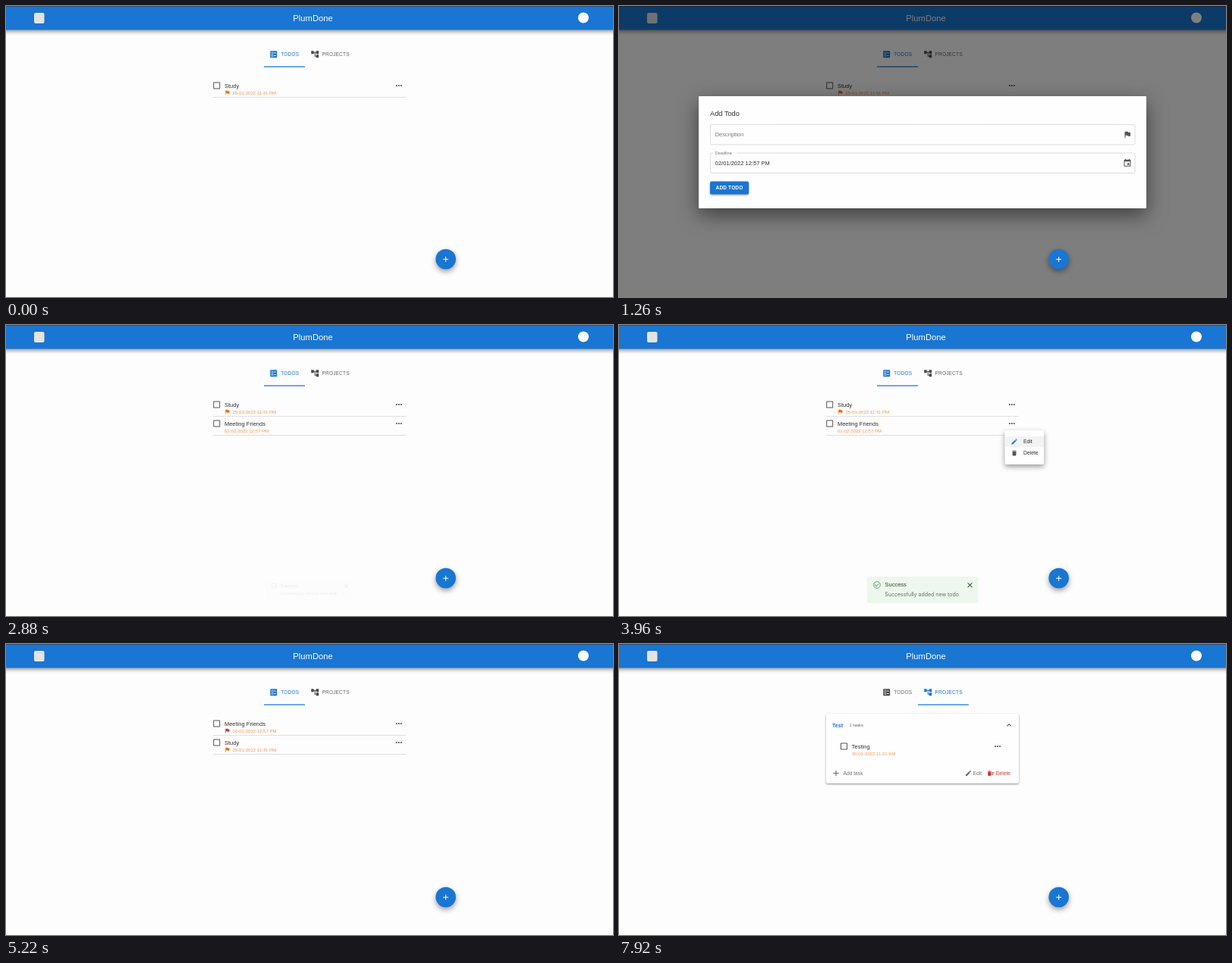
Recreate the animation shown at these times as an HTML page with a canvas. Size 800 px wide and 384 px high, loop 8 s.

```html
<!DOCTYPE html>
<html lang="en">
<head>
<meta charset="utf-8">
<title>Todo app demo</title>
<style>
html, body { margin: 0; width: 100%; height: 100%; overflow: hidden; background: #fefdfe; }
canvas { display: block; }
</style>
</head>
<body>
<canvas id="stage" width="800" height="384"></canvas>
<script>
const ctx = document.getElementById('stage').getContext('2d');
const LOOP = 8000;
const SANS = '"Liberation Sans", Arial, sans-serif';
const BLUE = '#1976d2', ORANGE = '#ed6c02', RED = '#d32f2f', INK = '#2c2c2e', GREY = '#666';
const MEETING = 'Meeting Friends', DUE = '02/01/2022 12:57 PM';

// Icons on a 24 unit grid
const ICONS = {
  tree: 'M22 11V3h-7v3H9V3H2v8h7V8h2v10h4v3h7v-8h-7v3h-2V8h2v3z',
  ballot: 'M13 9.5h5v-2h-5zM13 16.5h5v-2h-5zM19 21H5c-1.1 0-2-.9-2-2V5c0-1.1.9-2 2-2h14c1.1 0 2 .9 2 2v14c0 1.1-.9 2-2 2zM6 11h5V6H6zM7 7h3v3H7zM6 18h5v-5H6zM7 14h3v3H7z',
  list: 'M20 3H4c-1.1 0-2 .9-2 2v14c0 1.1.9 2 2 2h16c1.1 0 2-.9 2-2V5c0-1.1-.9-2-2-2zM10 17H5v-2h5zM10 13H5v-2h5zM10 9H5V7h5zM14.8 15L12 12.2l1.4-1.4 1.4 1.4L18 9l1.4 1.4z',
  flag: 'M14.4 6L14 4H5v17h2v-7h5.6l.4 2h7V6z',
  more: 'M4 12a2 2 0 1 0 4 0a2 2 0 1 0-4 0zM10 12a2 2 0 1 0 4 0a2 2 0 1 0-4 0zM16 12a2 2 0 1 0 4 0a2 2 0 1 0-4 0z',
  date: 'M17 12h-5v5h5zM16 1v2H8V1H6v2H5c-1.1 0-2 .9-2 2v14c0 1.1.9 2 2 2h14c1.1 0 2-.9 2-2V5c0-1.1-.9-2-2-2h-1V1zM19 19H5V8h14z',
  box: 'M19 5v14H5V5zM19 3H5c-1.1 0-2 .9-2 2v14c0 1.1.9 2 2 2h14c1.1 0 2-.9 2-2V5c0-1.1-.9-2-2-2z',
  add: 'M19 13h-6v6h-2v-6H5v-2h6V5h2v6h6z',
  edit: 'M3 17.25V21h3.75L17.8 9.94l-3.75-3.75zM20.7 7.04c.4-.4.4-1 0-1.4l-2.34-2.35c-.4-.4-1-.4-1.4 0l-1.83 1.83 3.75 3.75z',
  bin: 'M6 19c0 1.1.9 2 2 2h8c1.1 0 2-.9 2-2V7H6zM19 4h-3.5l-1-1h-5l-1 1H5v2h14z',
  sweep: 'M15 16h4v2h-4zM15 8h7v2h-7zM15 12h6v2h-6zM3 18c0 1.1.9 2 2 2h6c1.1 0 2-.9 2-2V8H3zM14 5h-3l-1-1H6L5 5H2v2h12z',
  close: 'M19 6.4L17.6 5 12 10.6 6.4 5 5 6.4 10.6 12 5 17.6 6.4 19 12 13.4 17.6 19 19 17.6 13.4 12z',
  done: 'M16.6 7.6L10 14.2l-3.6-3.6L5 12l5 5 8-8zM2 12a10 10 0 1 0 20 0a10 10 0 1 0-20 0zM4 12a8 8 0 1 0 16 0a8 8 0 1 0-16 0z',
  up: 'M12 8l-6 6 1.4 1.4 4.6-4.6 4.6 4.6L18 14z'
};
for (const k in ICONS) ICONS[k] = new Path2D(ICONS[k]);

// Eased progress from a over d ms
function ease(t, a, d) {
  const p = Math.min(1, Math.max(0, (t - a) / d));
  return p * p * (3 - 2 * p);
}
const during = (t, a, b) => t >= a && t < b;
const mix = (a, b, p) => a + (b - a) * p;

function text(s, x, y, size, color, { weight = 400, spacing = 0, align = 'left', font = SANS } = {}) {
  ctx.font = `${weight} ${size}px ${font}`;
  ctx.letterSpacing = spacing + 'px';
  ctx.textAlign = align;
  ctx.fillStyle = color;
  ctx.fillText(s, x, y);
}
const body = (s, x, y, color = INK) => text(s, x, y, 7.4, color, { spacing: .07 });

function icon(name, x, y, scale, color, turn = 0) {
  ctx.save();
  ctx.translate(x, y);
  ctx.rotate(turn);
  ctx.scale(scale, scale);
  ctx.translate(-12, -12);
  ctx.fillStyle = color;
  ctx.fill(ICONS[name], 'evenodd');
  ctx.restore();
}

function withShadow(blur, dy, alpha, paint) {
  ctx.save();
  ctx.shadowColor = `rgba(0,0,0,${alpha})`;
  ctx.shadowBlur = blur;
  ctx.shadowOffsetY = dy;
  paint();
  ctx.restore();
}

function rect(x, y, w, h, color, r = 0) {
  ctx.fillStyle = color;
  ctx.beginPath();
  ctx.roundRect(x, y, w, h, r);
  ctx.fill();
}

function disc(x, y, r, color) {
  ctx.fillStyle = color;
  ctx.beginPath();
  ctx.arc(x, y, r, 0, 7);
  ctx.fill();
}

// Paints a popup grown and faded by p around (x, y)
function grow(p, x, y, paint, from = .75) {
  if (p <= 0) return;
  const s = mix(from, 1, p);
  ctx.save();
  ctx.globalAlpha = p;
  ctx.translate(x, y);
  ctx.scale(s, s);
  ctx.translate(-x, -y);
  paint();
  ctx.restore();
}

function header() {
  withShadow(5, 2, .4, () => rect(-10, 0, 820, 31.5, BLUE));
  rect(0, 0, 800, 1, '#2b4a68');
  rect(37, 9, 13.5, 14, '#e6e3e1', 2);
  disc(761, 15.5, 7, '#fff');
  text('PlumDone', 404.5, 20, 11.1, '#fff', { spacing: .08, align: 'center' });
}

function tabs(t) {
  const p = ease(t, 6800, 270), projects = t >= 6800;
  const label = { spacing: .19 };
  icon('ballot', 352.7, 63.7, .5, projects ? '#4a4a4a' : BLUE);
  text('TODOS', 362.3, 66.2, 6.5, projects ? GREY : BLUE, label);
  icon('tree', 407.2, 63.7, .5, projects ? BLUE : '#4a4a4a');
  text('PROJECTS', 416.5, 66.2, 6.5, projects ? BLUE : GREY, label);
  rect(mix(340, 394, p), 79.6, mix(54, 67, p), 1.1, BLUE);
}

function task(name, date, x, y, moreX, flag) {
  icon('box', x, y, .5, '#555');
  body(name, x + 10.2, y + 2.7);
  if (flag) icon('flag', x + 14, y + 9.5, .34, flag);
  text(date, x + (flag ? 20.7 : 10.2), y + 12, 6, '#f2924a');
  icon('more', moreX, y, .5, '#444');
}

function todoList(t) {
  const rows = [['Study', '25-01-2022 11:41 PM', ORANGE]];
  const edited = t >= 4960;
  const meeting = [MEETING, '01-02-2022 12:57 PM', edited ? RED : null];
  if (edited) rows.unshift(meeting);
  else if (t >= 2740) rows.push(meeting);
  const hover = ease(t, 5720, 120) - ease(t, 6420, 120);
  if (hover > 0) disc(277.7, 105, 9, `rgba(25,118,210,${.06 * hover})`);
  rows.forEach(([name, date, flag], i) => {
    const y = 105 + i * 25;
    task(name, date, 277.7, y, 517.8, flag);
    rect(273, y + 15, 254, .7, 'rgba(0,0,0,.16)');
  });
}

function project(t) {
  const p = ease(t, 7240, 250), h = mix(29, 92, p);
  withShadow(2.5, 1, .45, () => rect(273, 92, 254, h, '#fffeff', 2));
  text('Test', 281, 109.5, 7.2, BLUE, { weight: 700 });
  text('1 tasks', 303.5, 109, 5.8, GREY);
  icon('up', 514, 107, .5, '#444', Math.PI * (1 - p));
  ctx.save();
  ctx.beginPath();
  ctx.rect(273, 119, 254, Math.max(0, h - 28));
  ctx.clip();
  task('Testing', '30-01-2022 11:21 AM', 296.5, 135, 499, null);
  icon('add', 286, 170.6, .52, GREY);
  text('Add task', 295.5, 172.8, 6.7, '#707070');
  icon('edit', 460.5, 170.6, .4, GREY);
  text('Edit', 466.5, 172.8, 6.7, '#707070');
  icon('sweep', 490, 170.6, .42, RED);
  text('Delete', 496.7, 172.8, 6.7, '#c0442c');
  ctx.restore();
}

function rowMenu(t) {
  const p = ease(t, 3560, 200) - ease(t, 4050, 120);
  grow(p, 518, 139, () => {
    withShadow(7, 3, .4, () => rect(508.5, 139, 51.5, 45, '#fffeff', 2));
    if (t > 3700) rect(508.5, 146.7, 51.5, 14.5, '#f4f3f4');
    icon('edit', 521, 154, .4, BLUE);
    text('Edit', 533, 156.3, 6.8, INK);
    icon('bin', 521, 169, .4, '#555');
    text('Delete', 533, 171.3, 6.8, INK);
  });
}

function toast(t, start, end, message) {
  grow(ease(t, start, 200) - ease(t, end, 150), 400, 349.5, () => {
    rect(327, 332, 146, 35, '#edf7ed', 2);
    icon('done', 340, 343, .48, '#6fa772');
    text('Success', 350.5, 345.3, 7.5, '#304332');
    text(message, 350.3, 358, 7, '#5f7361', { font: 'Inter, sans-serif' });
    icon('close', 462.5, 343.2, .46, '#263a28');
  });
}

// Outlined field; float is 1 when the label sits on the border
function field(y, label, value, float, focus, endIcon, endColor) {
  ctx.strokeStyle = focus ? BLUE : 'rgba(0,0,0,.2)';
  ctx.lineWidth = focus ? 1.2 : .7;
  ctx.beginPath();
  ctx.roundRect(120.4, y, 559.6, 26.5, 2.2);
  ctx.stroke();
  if (float > 0) rect(124.5, y - 1, 31 * float, 2, '#fffeff');
  text(label, 126.7, mix(y + 15.8, y + 1.9, float), mix(7.5, 5.6, float), focus ? BLUE : '#777');
  body(value, 126.7, y + 16);
  if (focus) {
    ctx.font = `7.4px ${SANS}`;
    ctx.letterSpacing = '.07px';
    rect(127 + ctx.measureText(value).width, y + 9, .7, 8.5, '#333');
  }
  icon(endIcon, 670, y + 13.3, .5, endColor);
}

function button(x, y, w, label, color) {
  withShadow(3, 1, .4, () => rect(x, y, w, 17, color, 2));
  text(label, x + w / 2, y + 10.8, 6.5, '#fff', { weight: 700, spacing: .16, align: 'center' });
}

function backdrop(t, start) {
  rect(0, 0, 800, 384, `rgba(0,0,0,${.5 * ease(t, start, 225)})`);
}

function sheet(y, h) {
  withShadow(26, 9, .5, () => rect(105, y, 590, h, '#fffeff', 1));
}

function addDialog(t) {
  backdrop(t, 930);
  sheet(119, 148);
  text('Add Todo', 120, 144.8, 9.2, INK);
  const n = Math.floor(Math.max(0, t - 1480) / 48);
  field(156.4, 'Description', MEETING.slice(0, n), ease(t, 1300, 180), during(t, 1300, 2620), 'flag', '#555');
  field(194, 'Deadline', DUE, 1, false, 'date', '#555');
  button(120, 231.6, 51, 'ADD TODO', t > 2560 ? '#1565c0' : BLUE);
}

function flagMenu(t) {
  const p = ease(t, 4330, 160) - ease(t, 4590, 130);
  grow(p, 685, 169, () => {
    withShadow(7, 3, .35, () => rect(659, 169, 52, 44, '#fffeff', 2));
    [['High', RED], ['Medium', ORANGE], ['Low', BLUE]].forEach(([name, color], i) => {
      icon('flag', 672, 178 + i * 12.6, .36, color);
      text(name, 681.5, 180.2 + i * 12.6, 6.3, INK);
    });
  }, .98);
}

function editDialog(t) {
  backdrop(t, 4090);
  sheet(132, 122);
  field(147.2, 'Description', MEETING, 1, false, 'flag', t < 4570 ? '#555' : RED);
  field(184.6, 'Deadline', DUE, 1, false, 'date', '#555');
  button(578, 222.2, 43, 'CANCEL', ORANGE);
  button(628.4, 222.2, 52, 'EDIT TODO', t > 4860 ? '#1565c0' : BLUE);
  flagMenu(t);
}

function speedDial(t) {
  const action = (y, name, open, close, color) => {
    grow(ease(t, open, 150) - ease(t, close, 150), 579.7, y, () => {
      withShadow(6, 2, .35, () => disc(579.7, y, 9.3, color));
      icon(name, 579.7, y, .46, '#444');
    }, .1);
  };
  action(300, 'list', 480, 1120, t > 720 ? '#dedddf' : '#fff');
  action(274, 'tree', 520, 1080, '#fff');
  withShadow(7, 3, .4, () => disc(579.6, 334, 13.3, BLUE));
  const turn = ease(t, 480, 200) - ease(t, 1080, 200);
  icon('add', 579.6, 334.2, .5, '#fff', turn * Math.PI / 4);
}

function draw(t) {
  rect(0, 0, 800, 384, '#fefdfe');
  header();
  tabs(t);
  if (t < 6800) todoList(t);
  else project(t);
  rowMenu(t);
  toast(t, 2840, 4060, 'Successfully added new todo');
  toast(t, 5320, 6440, 'Successfully edited todo');
  if (during(t, 930, 2740)) addDialog(t);
  if (during(t, 4090, 4960)) editDialog(t);
  speedDial(t);
}

const begin = performance.now();
function tick() {
  draw((performance.now() - begin) % LOOP);
  requestAnimationFrame(tick);
}
tick();
</script>
</body>
</html>
```
